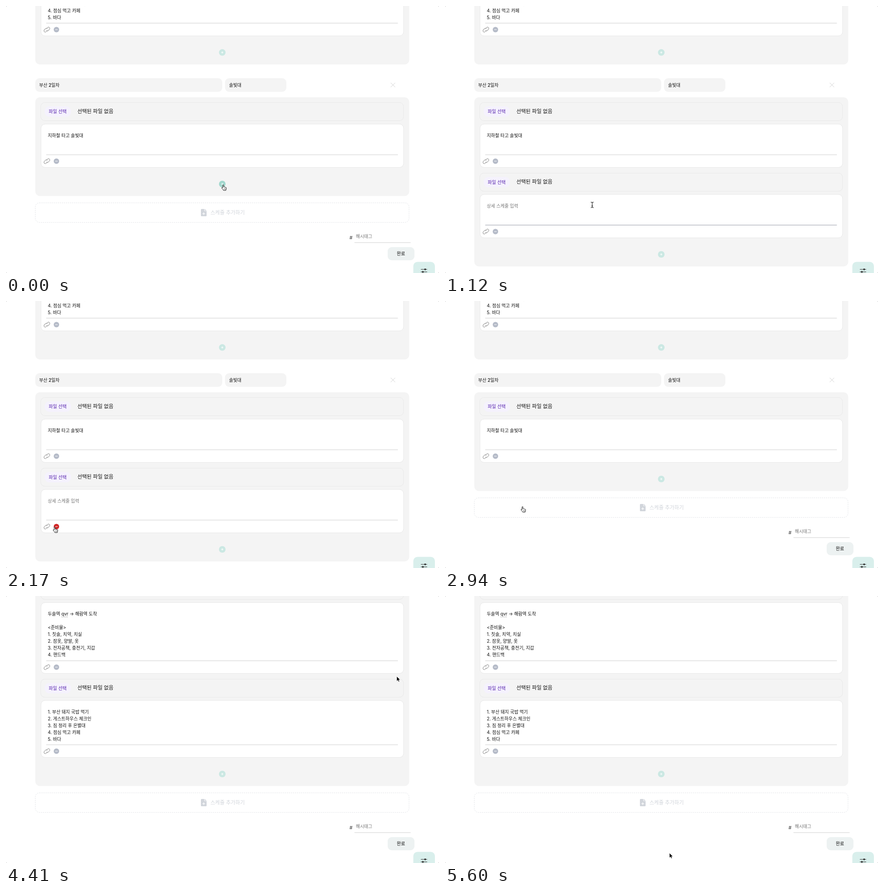
An HTML page for the animation above (5.67 s loop, 953 by 588 pixels).

```html
<!DOCTYPE html>
<html lang="ko">
<head>
<meta charset="utf-8">
<style>
html, body { margin: 0; width: 100%; height: 100%; overflow: hidden; background: #999; }
svg { display: block; width: 953px; height: 588px; background: #fff; border-radius: 2px; }
text { font: 9.85px Inter, "Noto Sans CJK KR", "Noto Sans CJK", sans-serif; fill: #111; white-space: pre; }
.hot { color: var(--c); }
</style>
</head>
<body>
<svg id="stage" viewBox="0 0 953 588"></svg>
<script>
const LOOP = 5670, STEP = 70, ADDED = 155;
const $ = id => document.getElementById(id);

// Drawing helpers
const rect = (x, y, w, h, r, fill, more = '') =>
  `<rect x="${x}" y="${y}" width="${w}" height="${h}" rx="${r}" fill="${fill}" ${more}/>`;
const text = (x, mid, str, style = '') =>
  `<text x="${x}" y="${mid + 3.6}" style="${style}">${str.replace(/</g, '&lt;')}</text>`;
const path = (d, stroke, width = 1, more = '') =>
  `<path d="${d}" fill="none" stroke="${stroke}" stroke-width="${width}" stroke-linecap="round" stroke-linejoin="round" ${more}/>`;
const at = (x, y, body, more = '') => `<g transform="translate(${x} ${y})" ${more}>${body}</g>`;

const fileRow = y =>
  rect(76.5, y, 798.5, 40, 9, '#f4f4f4', 'stroke="#e9e9e9"') +
  rect(85, y + 8.5, 58, 23, 11, '#f5f2fd') +
  text(94, y + 20, '파일 선택', 'font-size:9.97px;font-weight:500;fill:#5420ad') +
  text(157, y + 19.8, '선택된 파일 없음', 'font-size:11.35px');

const link = path('M-1 -2 1.5 -4.6A2.9 2.9 0 0 1 5.6 -.5L3.1 2A2.9 2.9 0 0 1 -1 2' +
  'M1 2 -1.5 4.6A2.9 2.9 0 0 1 -5.6 .5L-3.1 -2A2.9 2.9 0 0 1 1 -2', '#a3a3a3', 1.1);

const card = (id, y, h, lines, style) =>
  rect(77, y, 798, h, 9, '#fff', 'stroke="#e8e8e8"') +
  lines.map((s, i) => text(92, y + 25 + i * 15, s, style)).join('') +
  `<path class="hot" id="line${id}" d="M88.5 ${y + h - 28}H862.5" stroke="currentColor" stroke-width="2"/>` +
  at(90, y + h - 13.8, link) +
  at(111, y + h - 13.8, '<circle r="6" fill="currentColor"/>' + path('M-2.2 0H2.2', '#fff', 1.1),
    `id="minus${id}" class="hot" style="--c:#b5bbc8"`);

const plus = (id, y) => at(476, y,
  '<circle r="7.3" fill="currentColor"/>' + path('M-2 0H2M0 -2V2', '#fff', 1.1),
  `id="${id}" class="hot" style="--c:#cbe8e3"`);

const day1 =
  rect(64.5, -40, 823, 458.5, 10, '#f4f4f4') +
  fileRow(-32.5) +
  card('A', 14.5, 156, ['두솔역 qvr → 해람역 도착', '', '<준비물>', '1. 칫솔, 치약, 치실',
    '2. 잠옷, 양말, 옷', '3. 전자공책, 충전기, 지갑', '4. 핸드백']) +
  path('M122.5 46H137', '#777', 1, 'stroke-dasharray="0.5 2"') +
  fileRow(183) +
  card('B', 230, 125.5, ['1. 부산 돼지 국밥 먹기', '2. 게스트하우스 체크인',
    '3. 짐 정리 후 은별대', '4. 점심 먹고 카페', '5. 바다']) +
  plus('plusA', 392);

const day2 =
  rect(64.5, 159, 411.5, 30, 9, '#f4f4f4') + rect(482, 159, 135, 30, 9, '#f4f4f4') +
  text(73, 174, '부산 2일차', 'font-weight:500') + text(491, 174, '솔빛대', 'font-weight:500') +
  `<g id="close" class="hot">${path('M847 169.3 856.3 178.6M856.3 169.3 847 178.6', 'currentColor')}</g>` +
  rect(64.5, 201, 823, 217.5, 10, '#f4f4f4', 'id="panel"') +
  fileRow(212.5) + card('C', 260, 95.5, ['지하철 타고 솔빛대']) +
  `<g id="extra">${fileRow(368)}${card('D', 415, 95.5, ['상세 스케줄 입력'], 'fill:#757575')}</g>` +
  `<g id="adder">${plus('plusB', 392)}</g>`;

const footer =
  '<g id="dash" class="hot">' +
  rect(64.5, 433.5, 822.5, 43, 9, 'none', 'stroke="currentColor" stroke-opacity=".65" stroke-dasharray="2.5 2"') +
  '<path d="M430.5 447H436.5V451.5H441.5V461.5Q441.5 463 440 463H430.5Q429 463 429 461.5V448.5Q429 447 430.5 447ZM437.5 447 441.5 450.7H437.5Z" fill="currentColor"/>' +
  path('M432.7 457.3H437.7M435.2 454.8V459.8', '#fff', 1.2) +
  text(450, 455.2, '스케줄 추가하기', 'font-size:11.24px;fill:currentColor') + '</g>' +
  text(756, 510, '#', 'font-size:10.5px;fill:#333') +
  text(770, 507.5, '해시태그', 'font-size:9.8px;fill:#757575') +
  path('M767.5 521H890', '#dfdfdf', 1.6) +
  rect(840, 531, 59, 29, 9, '#edf2f2') + text(860, 545.5, '완료', 'font-size:10px;font-weight:500');

const settings = rect(896.5, 563.5, 47.5, 40, 9, '#d9efec') +
  path('M913.5 580H926.5M913.5 585.5H926.5', '#333', 1.2) +
  '<circle cx="922.5" cy="580" r="1.9" fill="#333"/><circle cx="917.5" cy="585.5" r="1.9" fill="#333"/>';

const pointers = {
  arrow: '<path d="M0 0V10.6L2.5 8.4 4.1 12 6 11.2 4.4 7.7H7.6Z" fill="#000" stroke="#fff" stroke-width=".7"/>',
  hand: '<path d="M-1 6.4V.9A1.1 1.1 0 0 1 1.2 .9V4.6Q2.5 3.9 3.1 4.9 4.4 4.4 5 5.4 6.8 5.2 6.8 6.8V8.6Q6.8 10 5.9 11V12H.6Q0 10.6 -1.3 9.3 -2.8 7.6 -3.2 6.6 -3.1 5.2 -1.7 5.8Z" fill="#fff" stroke="#111" stroke-width="1"/>' +
    path('M1.8 7.8V10M3.4 7.8V10M5 7.8V10', '#333', .6),
  beam: path('M-2.8 -6Q-.6 -6 0 -5 .6 -6 2.8 -6M0 -5V5M-2.8 6Q-.6 6 0 5 .6 6 2.8 6M-1.3 2.2H1.3', '#111', 1.1)
};

$('stage').innerHTML = `<g id="day1">${day1}</g><g id="day2">${day2}</g><g id="footer">${footer}</g>` +
  settings + '<g id="cursor">' +
  Object.entries(pointers).map(([k, s]) => `<g id="${k}">${s}</g>`).join('') + '</g>';

// Layouts: 1 = first day only, 2 = both days, 3 = both days with an added entry
const layout = t => t >= 4200 ? 1 : t >= 420 && t < 2520 ? 3 : 2;

// Hover areas: id, layouts, pointer, box, resting and hovered colour
const LINE = ['#e5e5e5', '#a9afbb'];
const areas = [
  ['plusB', [2], 'hand', [468, 384, 484, 400], '#cbe8e3', '#a2d8ce'],
  ['minusD', [3], 'hand', [104, 490, 118, 504], '#b5bbc8', '#d02626'],
  ['close', [2], 'hand', [840, 162, 868, 186], '#d2d2d2', '#c0392f'],
  ['dash', [1, 2], 'hand', [64, 433, 888, 477], '#d1d5db', '#9ca3af'],
  ['lineA', [1], 'beam', [88, 14, 863, 143], ...LINE],
  ['lineB', [1], 'beam', [88, 230, 863, 328], ...LINE],
  ['lineC', [2, 3], 'beam', [88, 260, 863, 328], ...LINE],
  ['lineD', [3], 'beam', [88, 415, 863, 483], ...LINE]
];

// Pointer route: time, x, y
const route = [
  [0, 478, 394], [560, 478, 394], [980, 385, 406], [1120, 324, 438], [1400, 215, 482],
  [1610, 154, 501], [1820, 154, 501], [2030, 112, 499], [2170, 107, 498], [2870, 107, 498],
  [2940, 170.5, 453], [3150, 430, 350], [3360, 740, 215], [3500, 871, 170], [3710, 860, 177],
  [4900, 860, 177], [5040, 825, 215], [5250, 690, 360], [5460, 530, 525], [5530, 503, 554], [5600, 494, 566]
];

function pointerAt(t) {
  const i = route.findIndex(p => p[0] > t);
  if (i < 0) return route.at(-1).slice(1);
  if (t <= 0) return route[0].slice(1);
  const [t0, x0, y0] = route[i - 1], [t1, x1, y1] = route[i];
  const k = (t - t0) / (t1 - t0);
  return [x0 + (x1 - x0) * k, y0 + (y1 - y0) * k];
}

function over([, layouts, , [x0, y0, x1, y1]], t) {
  const [x, y] = pointerAt(t);
  return layouts.includes(layout(t)) && x >= x0 && x <= x1 && y >= y0 && y <= y1;
}

const move = (id, x, y) => $(id).setAttribute('transform', `translate(${x} ${y})`);
const show = (id, on) => $(id).style.display = on ? '' : 'none';

function draw(t) {
  const mode = layout(t), grow = mode === 3 ? ADDED : 0;
  move('day1', 0, mode === 1 ? 0 : -289.7);
  show('day2', mode > 1);
  show('extra', grow);
  $('panel').setAttribute('height', 217.5 + grow);
  move('adder', 0, grow);
  move('footer', 0, grow);

  let kind = 'arrow';
  for (const area of areas) {
    const [id, , pointer, , cold, hot] = area;
    if (over(area, t)) kind = pointer;
    // Colours fade over two steps, lagging the pointer
    const heat = (over(area, t - STEP) + over(area, t - 2 * STEP)) * 50;
    $(id).style.setProperty('--c', `color-mix(in srgb, ${hot} ${heat}%, ${cold})`);
  }
  for (const k in pointers) show(k, k === kind);
  move('cursor', ...pointerAt(t));
}

function tick() {
  const t = performance.now() % LOOP;
  draw(Math.floor(t / STEP) * STEP);
  requestAnimationFrame(tick);
}
tick();
</script>
</body>
</html>
```
